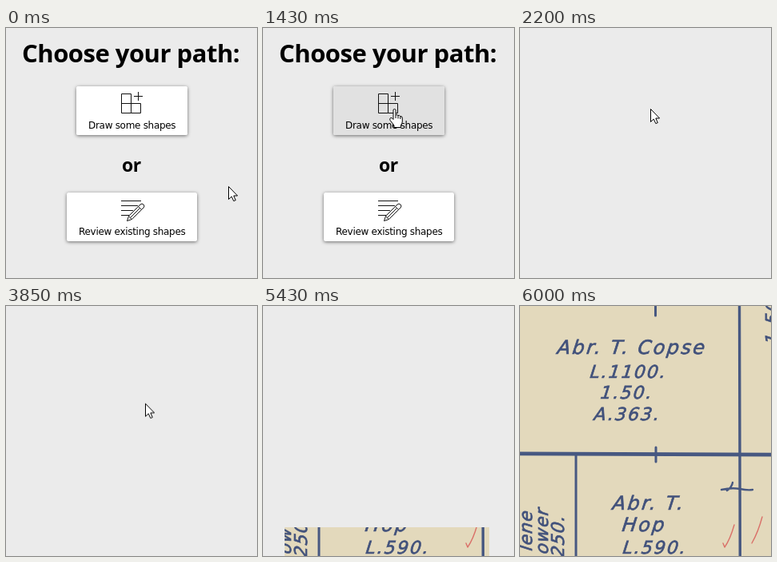
An HTML page that plays this animation: 314x313 px, repeating every 6.53 s.

```html
<!DOCTYPE html>
<html lang="en">
<head>
<meta charset="utf-8">
<title>Choose your path</title>
<style>
html, body { margin: 0; width: 100%; height: 100%; overflow: hidden; background: #ebebeb; }
svg { display: block; width: 314px; height: 313px; }

.page, .btn, .cursor, .arrow, .hand, .tiles rect { animation: 6530ms step-end infinite; }

.head { font: bold 31px "Open Sans", "Noto Sans", sans-serif; letter-spacing: -.5px; }
.or { font: bold 23px "Open Sans", "Noto Sans", sans-serif; letter-spacing: -.5px; }
.label { font: 12px "DejaVu Sans", sans-serif; letter-spacing: -.3px; }
.box { fill: #fff; filter: drop-shadow(0 1px 2px rgba(0,0,0,.55)); }
.icon { fill: none; stroke: #111; stroke-width: 1; }

.page { animation-name: page; }
@keyframes page { from { opacity: 1 } 33.69%, to { opacity: 0 } }
.btn { animation-name: press; }
@keyframes press {
  from { fill: #fff }
  15.4% { fill: #e1e1e1 }
  30.93%, to { fill: #d2d2d2 }
}

/* pointer: sampled moves, arrow over the page, hand over the button */
.cursor { animation-name: move; }
@keyframes move {
  0% { transform: translate(278px, 198px); }
  9.95% { transform: translate(278px, 198px); animation-timing-function: steps(3, start); }
  13.23% { transform: translate(238px, 162px); animation-timing-function: steps(3, start); }
  16.5% { transform: translate(199px, 125px); animation-timing-function: steps(3, start); }
  19.77% { transform: translate(178px, 107px); }
  20.06% { transform: translate(178px, 107px); animation-timing-function: steps(3, start); }
  22.8% { transform: translate(163px, 101px); }
  58.95% { transform: translate(163px, 101px); animation-timing-function: steps(4, start); }
  63.09%, to { transform: translate(207px, 184px); }
}
.arrow { animation-name: arrow; }
@keyframes arrow {
  from { opacity: 1 }
  15.4% { opacity: 0 }
  33.69% { opacity: 1 }
  63.09%, to { opacity: 0 }
}
.hand { animation-name: hand; }
@keyframes hand {
  from { opacity: 0 }
  15.4% { opacity: 1 }
  33.69%, to { opacity: 0 }
}

/* each cover lifts when its 256px map tile arrives */
.tiles { fill: #ebebeb; }
.tiles .a { animation-name: a; }
.tiles .b { animation-name: b; }
.tiles .c { animation-name: c; }
.tiles .d { animation-name: d; }
.tiles .e { animation-name: e; }
.tiles .f { animation-name: f; }
@keyframes a { from { opacity: 1 } 83.15%, to { opacity: 0 } }
@keyframes b { from { opacity: 1 } 84.07%, to { opacity: 0 } }
@keyframes c { from { opacity: 1 } 86.82%, to { opacity: 0 } }
@keyframes d { from { opacity: 1 } 88.2%, to { opacity: 0 } }
@keyframes e { from { opacity: 1 } 89.12%, to { opacity: 0 } }
@keyframes f { from { opacity: 1 } 91.88%, to { opacity: 0 } }

/* lettering leans further than the plain italic */
.ink text {
  font: italic 22px "DejaVu Sans", sans-serif; letter-spacing: 2px;
  fill: #41517b; stroke: #41517b; stroke-width: .7;
  transform: skewX(-7deg); transform-box: fill-box; transform-origin: 0 80%;
}
.ink .name { font-size: 24px; letter-spacing: 2.4px; }
.ink .side { letter-spacing: 1px; text-anchor: end; }
.ink path { fill: none; stroke: #475881; stroke-linecap: round; stroke-linejoin: round; }
.ink .red { stroke: #da7169; stroke-width: 1.4; }
</style>
</head>
<body>
<svg viewBox="0 0 314 313">
  <g class="ink">
    <rect width="314" height="313" fill="#e3d9bc"/>
    <path d="M-3 184.8 L317 186.2" stroke-width="4.8"/>
    <path d="M274.5 -3 L275.3 316" stroke-width="3.4"/>
    <path d="M70 187 V316 M170 177 V195 M169.5 -3 V12" stroke-width="3"/>
    <path d="M266 221 Q265 227 259 231 M252 230 Q265 227 275 229 T291 230" stroke-width="2.4"/>
    <text class="name" x="46" y="60">Abr. T. Copse</text>
    <text x="87" y="90">L.1100.</text>
    <text x="100" y="116">1.50.</text>
    <text x="92" y="143">A.363.</text>
    <text class="name" x="115" y="255">Abr. T.</text>
    <text class="name" x="127" y="282">Hop</text>
    <text x="128" y="310">L.590.</text>
    <g transform="translate(15 256) rotate(-90)"><text class="side">lene</text></g>
    <g transform="translate(35 253) rotate(-90)"><text class="side">ower</text></g>
    <g transform="translate(55 262) rotate(-90)"><text class="side">250.</text></g>
    <g transform="translate(323 49) rotate(-90)"><text>1.50</text></g>
    <path class="red" d="M254 297 L256 302 Q263 292 268 274 M290 297 Q298 283 303 264"/>
  </g>

  <g class="tiles">
    <rect class="a" x="27" y="277" width="256" height="36"/>
    <rect class="b" x="27" y="21" width="256" height="256"/>
    <rect class="b" x="283" y="21" width="31" height="256"/>
    <rect class="c" x="283" y="277" width="31" height="36"/>
    <rect class="d" x="27" y="0" width="256" height="21"/>
    <rect class="d" x="0" y="21" width="27" height="256"/>
    <rect class="e" x="283" y="0" width="31" height="21"/>
    <rect class="e" x="0" y="277" width="27" height="36"/>
    <rect class="f" x="0" y="0" width="27" height="21"/>
  </g>

  <g class="page">
    <text class="head" x="20" y="43">Choose your path:</text>
    <rect class="box" x="88" y="73" width="139" height="61" rx="2.5"/>
    <rect class="btn" x="88" y="73" width="139" height="61" rx="2.5"/>
    <path class="icon" d="M144.5 82.5 H156.5 V106.5 H144.5 Z M144.5 94.5 H168.5 V106.5 H156.5 M165.5 80 V91 M160 85.5 H171"/>
    <text class="label" x="103" y="126">Draw some shapes</text>
    <text class="or" x="145" y="180">or</text>
    <rect class="box" x="76" y="206" width="163" height="61" rx="2.5"/>
    <path class="icon" d="M144 216.5 H169 M144 222.5 H165 M144 228.5 H159 M144 234.5 H154"/>
    <path class="icon" style="fill:#fff" d="M151.5 241.5 L153.5 235.5 L168 221 Q170 219 172 221 T172 225 L157.5 239.5 Z M153.5 235.5 L157.5 239.5 M165.5 223.5 L169.5 227.5 M155.5 237.5 L167.5 225.5"/>
    <text class="label" x="91" y="259">Review existing shapes</text>
  </g>

  <g class="cursor" fill="#fff" stroke="#000" stroke-linejoin="round">
    <path class="arrow" d="M.5 .5 V16.5 L4.2 13 L6.8 18.6 L9.3 17.6 L6.8 12 H11.6 Z"/>
    <g class="hand">
      <path d="M0 13.5 V2 Q0 .5 1.5 .5 T3 2 V8 Q4.6 7 6 8.6 Q7.8 7.8 8.8 9.6 Q11.3 9 11.3 12 V16 Q11.3 18.5 9.5 20.5 V23.5 H1 V21 L-4 14.5 Q-5 12 -3 11.4 Q-1.6 11.2 0 13.5 Z"/>
      <path d="M3 8 V12 M6 8.6 V12.5 M8.8 9.6 V13" fill="none"/>
    </g>
  </g>
</svg>
</body>
</html>
```
